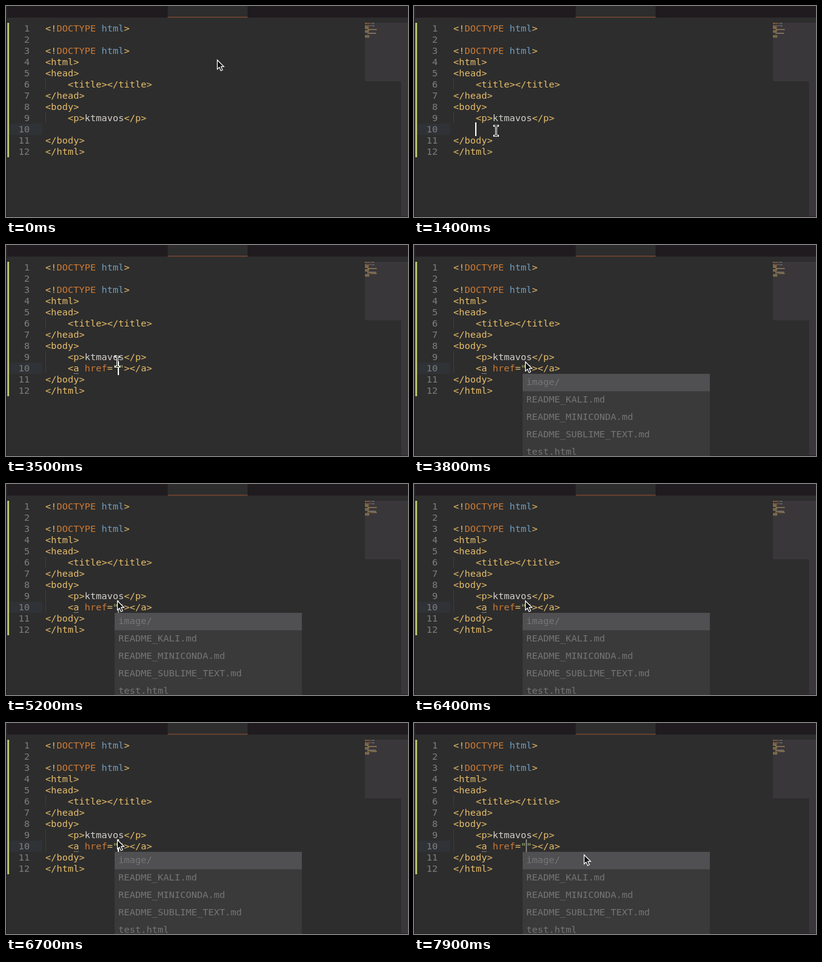
Animation, 644 px wide and 339 px high, one loop 8 s. Source, as an HTML page:

```html
<!DOCTYPE html>
<html lang="en">
<head>
<meta charset="utf-8">
<title>Editor autocompletion</title>
<style>
  html, body { margin: 0; width: 100%; height: 100%; overflow: hidden; background: #2d2d2d; }
  svg { display: block; }
  text { font: 14.95px "DejaVu Sans Mono", monospace; white-space: pre; }
</style>
</head>
<body>
<svg width="644" height="339" viewBox="0 0 644 339">
  <rect width="644" height="339" fill="#2d2d2d"/>
  <rect width="644" height="19" fill="#1f1b1f"/>
  <rect y="18" width="644" height="1" fill="#262326"/>
  <rect x="259" width="128" height="17" fill="#2d2d2d"/>
  <rect x="259" y="17" width="128" height="2" fill="#64402f"/>
  <rect width="2" height="339" fill="#272528"/>
  <rect x="2" y="27" width="3" height="216" fill="#b7bf70"/>
  <rect x="5" y="189" width="53" height="18" fill="#2f3236"/>
  <rect x="575" y="27" width="69" height="94" fill="#3a373b"/>
  <rect x="633" y="121" width="11" height="218" fill="#3a373b"/>
  <rect y="338" width="644" height="1" fill="#2a2226"/>
  <g id="page"></g>
  <g id="edited"></g>
  <rect id="caret" width="2" height="22" y="187" fill="#fff"/>
  <g id="popup"></g>
  <g id="beam" fill="none" stroke-linecap="square">
    <path id="beamShape" d="M-2.5,-7.5H-1.5L.5,-6.5L2.5,-7.5H3.5M.5,-6.5V7.5M-2.5,8.5H-1.5L.5,7.5L2.5,8.5H3.5" stroke="#fff" stroke-width="3"/>
    <use href="#beamShape" style="display:none"/>
    <path d="M-2,-7.5H3M.5,-7V8M-2,8.5H3" stroke="#111" stroke-width="1"/>
  </g>
  <path id="arrow" d="M.5,.8V15.5L3.8,12.4L6.2,18L8.9,16.8L6.5,11.4H11Z" fill="#111" stroke="#fff" stroke-width="1.2"/>
</svg>
<script>
const LOOP = 8000, LEFT = 63, CHAR = 9, ROW = 18, TOP = 27;
const colors = { tag: "#e6bd6b", keyword: "#cc7a35", name: "#6f9cbe", plain: "#d3d0cc", string: "#a5b56f" };
const $ = id => document.getElementById(id);
const escapeText = s => s.replace(/&/g, "&amp;").replace(/</g, "&lt;");
const rect = (x, y, w, h, fill, extra = "") =>
  `<rect x="${x}" y="${y}" width="${w}" height="${h}" fill="${fill}" ${extra}/>`;
const label = (x, y, fill, s, extra = "") =>
  `<text x="${x}" y="${y}" fill="${fill}" ${extra}>${escapeText(s)}</text>`;

const doctype = [["tag", "<!"], ["keyword", "DOCTYPE "], ["name", "html"], ["tag", ">"]];
const tag = s => [["tag", s]];
const lines = [
  doctype, [], doctype, tag("<html>"), tag("<head>"), tag("    <title></title>"),
  tag("</head>"), tag("<body>"),
  [["tag", "    <p>"], ["plain", "ktmavos"], ["tag", "</p>"]],
  [], tag("</body>"), tag("</html>")
];

// One line of code with its indent guide and minimap strokes.
function codeLine(tokens, index) {
  const top = TOP + index * ROW;
  let column = 0, out = "";
  for (const [kind, s] of tokens) {
    out += label(LEFT + column * CHAR, top + 14, colors[kind], s);
    for (const run of s.matchAll(/\S+/g))
      out += rect(575 + column + run.index, TOP + index * 2, run[0].length, 1.5, colors[kind], 'opacity=".5"');
    column += s.length;
  }
  if (tokens.length && tokens[0][1].startsWith("    "))
    out += `<path d="M63.5,${top}v18" stroke="#4b4b4b" stroke-dasharray="1 1"/>`;
  return out;
}

function popup(x, items, selected) {
  return rect(x, 207, 300, 132, "#3a3a3a") +
    rect(x, 207 + selected * 28, 300, 28, "#504f51") +
    items.map((s, i) => label(x + 6, 225 + i * 28, "#777577", s)).join("");
}

$("page").innerHTML = lines.map((tokens, i) =>
  label(38, TOP + i * ROW + 14, "#807e7e", String(i + 1), 'text-anchor="end"') + codeLine(tokens, i)).join("");

const link = [["tag", "    <a "], ["keyword", "href"], ["tag", "="], ["string", '""'], ["tag", "></a>"]];
const underline = '<path d="M109,206.5h8" stroke="#cfcac0" stroke-dasharray="1 1"/>';
const edits = [
  [0, ""],
  [2300, codeLine([["plain", "    <"]], 9)],
  [3200, codeLine([["plain", "    <a"]], 9)],
  [3500, codeLine(link, 9) + underline]
];

const tags = ["a", "abbr", "acronym", "address", "applet"];
const files = ["image/", "README_KALI.md", "README_MINICONDA.md", "README_SUBLIME_TEXT.md", "test.html"];
const popups = [
  [0, ""], [3200, popup(102, tags, 0)], [3500, ""], [3600, popup(174, files, 0)],
  [6500, popup(174, files, 1)], [6700, popup(174, files, 0)]
];

const caretX = [[0, 98], [2300, 107], [3200, 116], [3500, 179]];
const caretAlpha = [
  [0, 0], [1300, 1], [1600, .5], [1700, 0], [2000, 1], [2600, 0], [2800, 1], [3000, 0], [3200, 1],
  [3800, 0], [4200, .5], [4300, 1], [4500, 0], [4900, .5], [5000, 1], [5200, .5], [5300, 0],
  [5400, .5], [5500, 1], [5700, 0], [6200, 1], [6400, 0], [6600, 1], [6800, 0], [7500, 1], [7900, .4]
];
const mouse = [
  [0, 338, 86], [800, 335, 83], [900, 270, 112], [1000, 180, 160], [1100, 90, 207], [1200, 38, 226],
  [1300, 88, 214], [1400, 131, 200], [1600, 134, 201], [1700, 146, 198], [1800, 160, 193],
  [1900, 172, 189], [2000, 178, 187], [7400, 180, 188], [7500, 196, 191], [7600, 220, 197],
  [7700, 245, 204], [7800, 264, 209], [7900, 272, 211]
];
const isArrow = [[0, true], [100, false], [3800, true]];

const at = (steps, t) => steps.findLast(step => step[0] <= t);
const shown = {};
function setContent(id, html) {
  if (shown[id] !== html) $(id).innerHTML = shown[id] = html;
}

function draw() {
  const t = performance.now() % LOOP;
  setContent("edited", at(edits, t)[1]);
  setContent("popup", at(popups, t)[1]);
  $("caret").setAttribute("x", at(caretX, t)[1]);
  $("caret").setAttribute("opacity", at(caretAlpha, t)[1]);
  const [, x, y] = at(mouse, t), arrow = at(isArrow, t)[1];
  for (const id of ["arrow", "beam"]) {
    $(id).setAttribute("transform", `translate(${x} ${y})`);
    $(id).style.display = (id === "arrow") === arrow ? "" : "none";
  }
  requestAnimationFrame(draw);
}
draw();
</script>
</body>
</html>
```
